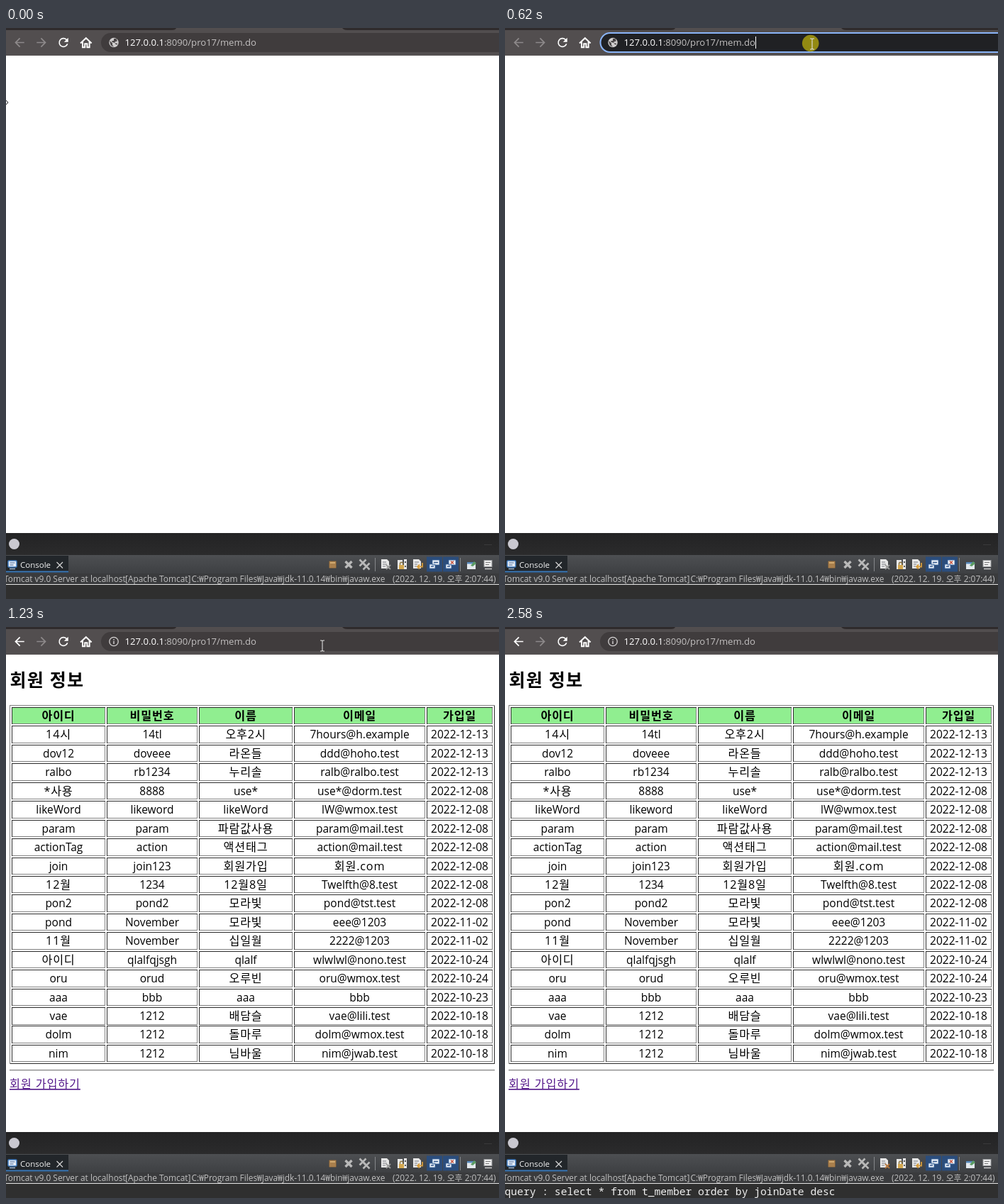
Write an HTML page that moves like this. It is 695 px wide and 805 px high and loops after 2640 ms.

```html
<!DOCTYPE html>
<html lang="ko">
<head>
<meta charset="utf-8">
<title>회원 정보</title>
<style>
  html, body { margin: 0; width: 100%; height: 100%; overflow: hidden; background: #fff; }
  svg { display: block; width: 695px; height: 805px; }
  text { font-family: 'Open Sans', 'Noto Sans CJK KR', 'Noto Sans CJK', sans-serif; white-space: pre; }
  .mid { text-anchor: middle; }
  .hangul { letter-spacing: .05em; }
  .crisp { shape-rendering: crispEdges; }
  .line { fill: none; stroke: #fff; stroke-width: 2; }
  .small { font-size: 11.9px; fill: #c0c0c0; }
</style>
</head>
<body>
<svg viewBox="0 0 695 805">
  <defs>
    <linearGradient id="bar" x2="0" y2="1">
      <stop stop-color="#4d4f52"/><stop offset="1" stop-color="#3e4043"/>
    </linearGradient>
    <linearGradient id="head" x2="0" y2="1">
      <stop stop-color="#232324"/><stop offset="1" stop-color="#2b2b2c"/>
    </linearGradient>
    <path id="cross" d="M-4.5 -4.5L4.5 4.5M4.5 -4.5L-4.5 4.5"/>
    <path id="sheet" d="M-6 -7H2L5 -4V6H-6Z" fill="#e8e8e8"/>
  </defs>

  <!-- browser bar -->
  <rect width="695" height="39" fill="#524e4f"/>
  <path d="M0 0H240Q239 3 234 3H0ZM474 0H695V3H481Q476 3 474 0Z" fill="#2f2b2c"/>
  <rect y="38" width="695" height="1" fill="#5d595a"/>
  <rect x="134" y="7" width="600" height="27" rx="13.5" fill="#403c3d"/>
  <rect id="ring" x="134.5" y="7" width="600" height="27" rx="13.5" fill="#202124" stroke="#8ab4f8" stroke-width="2"/>

  <path id="back" transform="translate(19 20.5) scale(.84)" d="M8 -1H-4.2L1.4 -6.6L0 -8L-8 0L0 8L1.4 6.6L-4.2 1H8Z"/>
  <path transform="translate(50 20.5) scale(-.84 .84)" fill="#8d898a" d="M8 -1H-4.2L1.4 -6.6L0 -8L-8 0L0 8L1.4 6.6L-4.2 1H8Z"/>
  <path id="reload" transform="translate(81 20.5) scale(.84)" fill="#fff"
    d="M5.65 -5.65A8 8 0 1 0 7.73 2H5.65A6 6 0 1 1 4.22 -4.22L1 -1H8V-8Z"/>
  <path id="stop" class="line" d="M75.7 15.2L86.3 25.8M86.3 15.2L75.7 25.8"/>
  <path class="line" d="M105 21.5L112.8 14.2L120.6 21.5M108 19.5V27.2H111.2V22.3H114.4V27.2H117.6V19.5"/>

  <g id="globe">
    <circle cx="152" cy="20.5" r="6.7" fill="#cfcdcd"/>
    <path d="M146.5 18L150 21.5V24L152 26.4Q146 25.5 146.5 18ZM152 15H155.5L156.8 18.5L153.5 19.5V21.5H156.5L157 23.6L154.6 23L153 20.8L149.5 20V18H152Z" fill="#4a4647"/>
  </g>
  <g id="info">
    <circle cx="152" cy="20.5" r="6.2" fill="none" stroke="#d6d4d4" stroke-width="1.3"/>
    <path d="M151.3 17H152.7V18.4H151.3ZM151.3 19.7H152.7V24H151.3Z" fill="#d6d4d4"/>
  </g>
  <text x="167.5" y="25.3" font-size="13.1" fill="#c2c0c0"><tspan fill="#fff">127.0.0.1</tspan>:8090/pro17/mem.do</text>
  <rect id="caret" x="353" y="12" width="1" height="17" fill="#fff"/>

  <!-- member page -->
  <g id="page">
    <text class="hangul" x="5.5" y="83.5" font-size="25" font-weight="700">회원 정보</text>
    <g id="cells"></g>
    <path class="crisp" d="M5 624.5H689" stroke="#858585"/>
    <path class="crisp" d="M5 625.5H689" stroke="#d8d8d8"/>
    <text class="hangul" x="5" y="650" font-size="16.3" fill="#551a8b" text-decoration="underline">회원 가입하기</text>
  </g>

  <!-- console -->
  <rect y="712" width="695" height="31" fill="url(#head)"/>
  <circle cx="11.5" cy="727.5" r="7.5" fill="#c9c8d0"/>
  <rect x="674" y="728" width="11" height="1" fill="#3a3a3b"/>
  <rect y="743" width="695" height="26" fill="url(#bar)"/>
  <path d="M0 744H88V768H0Z" fill="#22262a"/>
  <path d="M0 766.5H88" stroke="#3a78b8" stroke-width="2"/>
  <rect x="3" y="751" width="12" height="9" rx="1" fill="#e6eef8" stroke="#3c78bd" stroke-width="1.5"/>
  <path d="M5.5 754H12.5M5.5 757H10.5" stroke="#3c5f92"/>
  <path d="M5 762.5H13" stroke="#9db9da" stroke-width="1.5"/>
  <text x="20" y="760.8" font-size="11.5" fill="#f2f2f2">Console</text>
  <path d="M71.5 753L80 761.5M80 753L71.5 761.5" stroke="#d5d5d5" stroke-width="1.2"/>

  <rect x="455.5" y="751.5" width="10" height="10" rx="1" fill="#a97f4c" stroke="#6f5a40"/>
  <path d="M457 754H464" stroke="#d0a970" stroke-width="2"/>
  <use href="#cross" x="483" y="756.5" stroke="#b9b9b9" stroke-width="3.4"/>
  <g stroke="#b9b9b9" stroke-width="2.6">
    <use href="#cross" x="503" y="754"/><use href="#cross" x="508" y="759"/>
  </g>
  <path class="crisp" d="M520.5 747V766M640.5 747V766" stroke="#85878a"/>

  <use href="#sheet" x="535" y="756"/>
  <path d="M531 753H536M531 756H537M531 759H535" stroke="#7a7d84"/>
  <path id="wipe" d="M536 757L542 763M542 757L536 763" stroke-width="1.8"/>

  <path d="M552 750H559V763H552ZM561 749H565V763H561Z" fill="#e8e8e8"/>
  <rect x="554" y="757" width="7" height="6" fill="#d4a850"/>
  <path d="M555.5 757V754.5Q557.5 752 559.5 754.5V757" fill="none" stroke="#8b7440" stroke-width="1.3"/>
  <path d="M563 752V754M563 758V760" stroke="#555" stroke-width="2"/>

  <use href="#sheet" x="580" y="756"/>
  <path d="M576 753H582M576 756H580M576 759H579" stroke="#7a7d84"/>
  <path d="M587 754V759.5H580M583 756.5L580 759.5L583 762.5" fill="none" stroke="#d59c3c" stroke-width="1.8"/>

  <path d="M593 745.5H615V766.5H593ZM616 745.5H638V766.5H616Z" fill="#2b4d7c"/>
  <path d="M601 750H611V757H601ZM597 756H605V762H597ZM624 750H634V757H624ZM620 756H628V762H620Z" fill="#edf2f8" stroke="#3b659d" stroke-width=".8"/>
  <path d="M603 753.5H609M599 759H603M622 759H626" stroke="#30568a" stroke-width="1.3"/>
  <path d="M627 751.5L631 755.5M631 751.5L627 755.5" stroke="#c9533c" stroke-width="1.4"/>

  <path d="M650 753H662V763H650Z" fill="#e4e9ee"/>
  <path d="M650 753H662V755.5H650Z" fill="#5588bc"/>
  <path d="M655 758L660 752L663 755L658 759Z" fill="#5b9c63"/>
  <rect x="674" y="750.5" width="11" height="9" fill="#eee" stroke="#9b9da0"/>
  <path d="M676 753.5H683M676 756.5H681" stroke="#777"/>
  <path d="M675 762.5H685" stroke="#cfcfcf" stroke-width="1.5"/>

  <rect y="769" width="695" height="15" fill="#3a3b3d"/>
  <g class="small">
    <text x="-3" y="780.5">Tomcat v9.0 Server at localhost</text>
    <text x="168" y="780.5">[Apache Tomcat]</text>
    <text x="261.5" y="780.5">C:₩Program Files₩Java₩jdk-11.0.14₩bin₩javaw.exe</text>
    <text x="545" y="780.5">(2022. 12. 19. 오후 2:07:44)</text>
  </g>
  <rect y="784" width="695" height="21" fill="#2f2f2f"/>
  <rect y="784" width="695" height="1" fill="#e4e4e4"/>
  <text id="query" x="-.5" y="801" font-size="14.67" fill="#f0f0f0" style="font-family:'Noto Sans Mono',monospace">query : select * from t_member order by joinDate desc</text>

  <!-- pointer -->
  <circle id="press" cx="430.7" cy="21.5" r="11.8" fill="#938a12"/>
  <path id="edge" d="M-3 -3L0 0L-3 3" fill="#fff" stroke="#222"/>
  <path id="beam" d="M-3 -7.5H-1L0 -6.5L1 -7.5H3M0 -6.5V6.5M-3 7.5H-1L0 6.5L1 7.5H3" fill="none" stroke="#dedede" stroke-width="1.1"/>
  <path id="arrow" d="M.5 .5V16L4 12.7L6.4 18.3L8.8 17.3L6.5 11.8H11.3Z" fill="#fff" stroke="#000"/>
</svg>

<script>
const $ = id => document.getElementById(id);
const LOOP = 2640;

const columns = [[8, 140], [142, 270], [272, 404], [406, 591], [593, 686]];
const members = `아이디|비밀번호|이름|이메일|가입일
14시|14tl|오후2시|7hours@h.example|2022-12-13
dov12|doveee|라온들|ddd@hoho.test|2022-12-13
ralbo|rb1234|누리솔|ralb@ralbo.test|2022-12-13
*사용|8888|use*|use*@dorm.test|2022-12-08
likeWord|likeword|likeWord|lW@wmox.test|2022-12-08
param|param|파람값사용|param@mail.test|2022-12-08
actionTag|action|액션태그|action@mail.test|2022-12-08
join|join123|회원가입|회원.com|2022-12-08
12월|1234|12월8일|Twelfth@8.test|2022-12-08
pon2|pond2|모라빛|pond@tst.test|2022-12-08
pond|November|모라빛|eee@1203|2022-11-02
11월|November|십일월|2222@1203|2022-11-02
아이디|qlalfqjsgh|qlalf|wlwlwl@nono.test|2022-10-24
oru|orud|오루빈|oru@wmox.test|2022-10-24
aaa|bbb|aaa|bbb|2022-10-23
vae|1212|배담슬|vae@lili.test|2022-10-18
dolm|1212|돌마루|dolm@wmox.test|2022-10-18
nim|1212|님바울|nim@jwab.test|2022-10-18`.split('\n').map(row => row.split('|'));

function add(tag, attrs, text = '') {
  const node = document.createElementNS('http://www.w3.org/2000/svg', tag);
  for (const key in attrs) node.setAttribute(key, attrs[key]);
  node.textContent = text;
  $('cells').append(node);
}

// Box with a one-pixel bevel: one colour for top and left, one for bottom and right
function bevel(x1, y1, x2, y2, fill, topLeft, bottomRight) {
  const edge = (d, stroke) => add('path', { class: 'crisp', d, fill: 'none', stroke });
  add('rect', { class: 'crisp', x: x1, y: y1, width: x2 - x1, height: y2 - y1, fill });
  edge(`M${x1} ${y2 - .5}H${x2 - .5}V${y1}`, bottomRight);
  edge(`M${x1 + .5} ${y2}V${y1 + .5}H${x2}`, topLeft);
}

const LIGHT = '#808080', DARK = '#2c2c2c';
bevel(5, 110, 689, 616, '#fff', LIGHT, DARK);
members.forEach((row, r) => row.forEach((value, c) => {
  const [left, right] = columns[c];
  const top = 113 + 26.44 * r;
  const head = r === 0;
  const hangul = /[가-힣]/.test(value);
  bevel(left, Math.round(top), right, Math.round(top + 24.48), head ? '#90ee90' : '#fff', DARK, LIGHT);
  add('text', {
    class: hangul ? 'mid hangul' : 'mid', x: (left + right) / 2, y: top + 18,
    'font-size': hangul ? 16.2 : 15.5, 'font-weight': head ? 700 : 400
  }, value);
}));

// Pointer steps: start time, shape, x, y
const steps = [
  [0, 'edge', 3, 105],
  [70, 'arrow', 110, 82],
  [140, 'arrow', 260, 48],
  [200, 'beam', 370, 32],
  [270, 'beam', 416.5, 28.5],
  [340, 'beam', 425, 26],
  [410, 'beam', 430, 24],
  [480, 'beam', 432, 23],
  [550, 'beam', 433, 22.5],
  [760, 'beam', 439, 24],
  [830, 'beam', 446, 26.5],
  [1890, 'arrow', 431, 92],
  [1960, 'arrow', 440, 230],
  [2030, 'arrow', 470, 460],
  [2100, 'arrow', 497, 660],
  [2180, 'arrow', 507, 770],
  [2250, 'none', 0, 0]
];

const show = (id, on) => { $(id).style.display = on ? '' : 'none'; };

function draw(now) {
  const t = now % LOOP;
  const within = (from, to = LOOP) => t >= from && t < to;
  const focused = within(620, 1160);
  const visited = within(1160);
  const loading = within(1160, 1230);

  show('ring', focused);
  show('caret', focused);
  show('press', within(620, 760));
  show('globe', !visited);
  show('info', visited);
  show('stop', loading);
  show('reload', !loading);
  show('page', within(1230));
  show('query', within(1290));
  $('back').setAttribute('fill', visited ? '#fff' : '#8d898a');
  $('wipe').setAttribute('stroke', within(1290) ? '#b5763c' : '#9b9b9b');

  const [, shape, x, y] = steps.findLast(step => step[0] <= t);
  for (const id of ['edge', 'beam', 'arrow']) show(id, id === shape);
  if (shape !== 'none') $(shape).setAttribute('transform', `translate(${x} ${y})`);
}

const start = performance.now();
function tick() {
  draw(performance.now() - start);
  requestAnimationFrame(tick);
}
tick();
</script>
</body>
</html>
```
